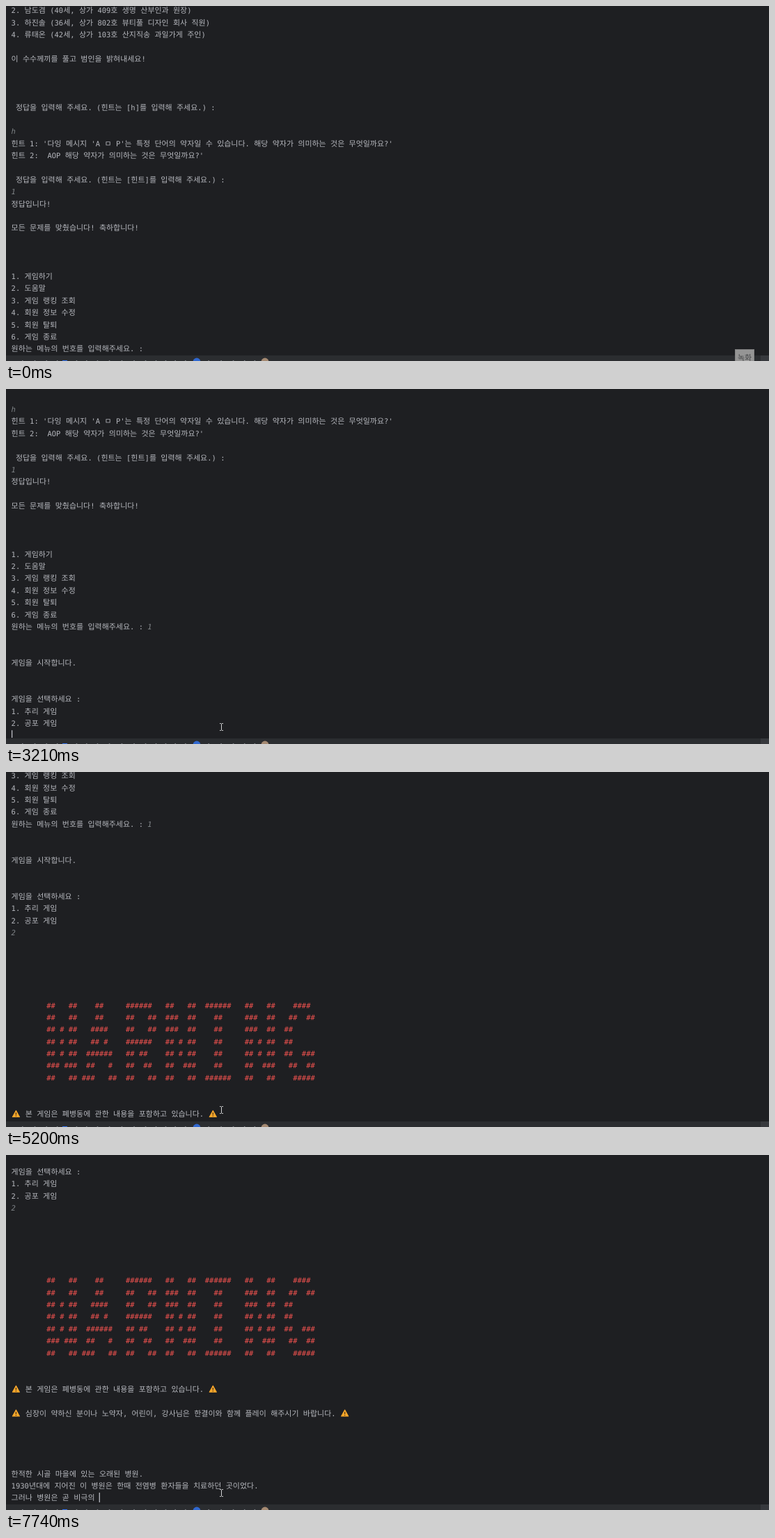
An HTML page that plays this animation: 1096 px wide and 511 px high, repeating every 8 s.

```html
<!DOCTYPE html>
<html lang="ko">
<head>
<meta charset="utf-8">
<title>콘솔 게임</title>
<style>
  html, body { margin: 0; width: 100%; height: 100%; overflow: hidden; background: #1e1f22; }
  svg { display: block; }
  text { white-space: pre; text-rendering: geometricPrecision; fill: #b5b7bd;
         font: 10.5px "DejaVu Sans Mono", monospace; }
  .ko { font: 10.98px "Noto Sans CJK KR", "Noto Sans CJK", sans-serif; }
  .input { fill: #7f8387; font-style: italic; }
  .banner { fill: #f0524f; }
  #tooltip text { fill: #444547; }
</style>
</head>
<body>
<svg width="1096" height="511" viewBox="0 0 1096 511">
  <defs>
    <clipPath id="view"><rect width="1096" height="502"/></clipPath>
    <g id="warn">
      <path d="M6.8 -8.6 L11.8 .4 H1.8 Z" fill="#f9a72b" stroke="#f9a72b" stroke-width="1.2" stroke-linejoin="round"/>
      <path d="M6.8 -5.9 V-2.6 M6.8 -1.5 V-.3" stroke="#3b2c18" stroke-width="1.2"/>
    </g>
  </defs>
  <rect width="1096" height="511" fill="#1e1f22"/>
  <g clip-path="url(#view)">
    <g id="rows"></g>
    <rect id="caret" width="1.2" height="14" fill="#c4c6cc"/>
  </g>
  <rect y="503" width="1096" height="8" fill="#2b2d30"/>
  <rect x="1084" y="503" width="12" height="8" fill="#37393d"/>
  <g id="ticks" fill="#85888e"></g>
  <rect x="81" y="510" width="7" height="1" fill="#3574f0"/>
  <circle cx="274" cy="512" r="5.4" fill="#3068d0"/>
  <circle cx="372" cy="512" r="5.4" fill="#a58a72"/>
  <g id="tooltip">
    <rect x="1047.5" y="494.5" width="27" height="18" fill="#959595" stroke="#828282"/>
    <text class="ko" x="1051" y="509.5">녹화</text>
  </g>
  <path id="pointer" d="M-2.5 -5 H-1 L0 -4.3 L1 -5 H2.5 M0 -4.3 V4.3 M-2.5 5 H-1 L0 4.3 L1 5 H2.5"
        fill="none" stroke="#d4d5d7"/>
</svg>
<script>
const LOOP = 8000, ROW = 17.39, LEFT = 7.6, BASE = 10.4, PAGE = 29;
const $ = id => document.getElementById(id);
const mix = (a, b, p) => a + (b - a) * p;

// "~" starts what the player types, "^" marks a banner row.
const intro = `2. 남도겸 (40세, 상가 409호 생명 산부인과 원장)
3. 하진솔 (36세, 상가 802호 뷰티풀 디자인 회사 직원)
4. 류태온 (42세, 상가 103호 산지직송 과일가게 주인)

이 수수께끼를 풀고 범인을 밝혀내세요!



 정답을 입력해 주세요. (힌트는 [h]를 입력해 주세요.) :

~h
힌트 1: '다잉 메시지 'A ㅁ P'는 특정 단어의 약자일 수 있습니다. 해당 약자가 의미하는 것은 무엇일까요?'
힌트 2:  AOP 해당 약자가 의미하는 것은 무엇일까요?'

 정답을 입력해 주세요. (힌트는 [힌트]를 입력해 주세요.) :
~1
정답입니다!

모든 문제를 맞췄습니다! 축하합니다!



1. 게임하기
2. 도움말
3. 게임 랭킹 조회
4. 회원 정보 수정
5. 회원 탈퇴
6. 게임 종료
원하는 메뉴의 번호를 입력해주세요. : ~1`;

const chooser = `
게임을 시작합니다.


게임을 선택하세요 :
1. 추리 게임
2. 공포 게임
~2`;

const title = `



^        ##   ##    ##     ######   ##   ##  ######   ##   ##    ####
^        ##   ##    ##     ##   ##  ###  ##    ##     ###  ##   ##  ##
^        ## # ##   ####    ##   ##  ###  ##    ##     ###  ##  ##
^        ## # ##   ## #    ######   ## # ##    ##     ## # ##  ##
^        ## # ##  ######   ## ##    ## # ##    ##     ## # ##  ##  ###
^        ### ###  ##   #   ##  ##   ##  ###    ##     ##  ###   ##  ##
^        ##   ## ###   ##  ##   ##  ##   ##  ######   ##   ##    #####


⚠ 본 게임은 폐병동에 관한 내용을 포함하고 있습니다. ⚠

⚠ 심장이 약하신 분이나 노약자, 어린이, 강사님은 한결이와 함께 플레이 해주시기 바랍니다. ⚠



`;

const prints = [
  { at: 0, text: intro, keyAt: 1670 },
  { at: 1930, text: '' },
  { at: 3070, text: chooser, keyAt: 3870 },
  { at: 4070, text: '' },
  { at: 5070, text: title }
];

// "|" ends a piece that appears at once; the rest comes with the next line.
const story = [
  { start: 5126, pace: 26, text: '한적한 시골 마을|에 있는 오래된 병|원.' },
  { start: 5797, pace: 37, text: '1930|년대에 지어진 |이 병원은 한때 |전염병 환자들을| 치료하던 곳|이었다. |' },
  { start: 7340, pace: 28, text: '그러나 병원은| 곧 비극의 |' }
];

function typedSoFar({ start, pace, text }, t) {
  const budget = (t - start) / pace;
  let shown = '';
  for (const piece of text.split('|').slice(0, -1)) {
    if ((shown + piece).length > budget) break;
    shown += piece;
  }
  return shown;
}

// A single new line jumps, a longer print glides.
function glide(elapsed, count) {
  const p = count === 1 ? 1 : Math.min(1, Math.floor(elapsed / 70) / 3);
  return 1 - (1 - p) ** 3;
}

function consoleAt(t) {
  const lines = [];
  let scroll = 0;
  for (const { at, text, keyAt } of prints) {
    if (t < at) break;
    const added = text.split('\n');
    if (t < keyAt) added.push(added.pop().split('~')[0]);
    lines.push(...added);
    scroll = mix(scroll, lines.length - PAGE, glide(t - at, added.length));
  }
  story.forEach((line, i) => {
    const shown = typedSoFar(line, t);
    if (!shown) return;
    if (i) lines[lines.length - 1] = story[i - 1].text.replaceAll('|', '');
    lines.push(shown);
    scroll = lines.length - PAGE;
  });
  return { lines, scroll };
}

const isKo = c => c >= 'ㄱ' && c <= '힣';
const width = s => [...s].reduce((w, c) => w + (c === '⚠' ? 13.9 : isKo(c) ? 10.1 : 6.32), 0);

function drawRuns(text, x, y, style) {
  let out = '';
  for (const run of text.match(/⚠|[ㄱ-힣]+|[^ㄱ-힣⚠]+/g) || []) {
    if (run === '⚠') out += `<use href="#warn" x="${x}" y="${y}"/>`;
    else if (run.trim()) out += `<text class="${style} ${isKo(run[0]) ? 'ko' : ''}" x="${x}" y="${y}">${run}</text>`;
    x += width(run);
  }
  return out;
}

function drawLine(line, y) {
  const style = line[0] === '^' ? 'banner' : '';
  const [output, input = ''] = line.replace('^', '').split('~');
  return drawRuns(output, LEFT, y, style) + drawRuns(input, LEFT + width(output), y, 'input');
}

let drawn;
function drawConsole(t) {
  const { lines, scroll } = consoleAt(t);
  const baseline = row => BASE + (row - scroll) * ROW;
  const svg = lines.map((line, row) => row < scroll - 1 ? '' : drawLine(line, baseline(row))).join('');
  if (svg !== drawn) $('rows').innerHTML = drawn = svg;

  const last = lines.length - 1;
  const caretOn = t >= 1000 && !(t >= 2530 && t < 3070);
  $('caret').setAttribute('x', Math.max(8, LEFT + width(lines[last].replace('~', '')) - 0.2));
  $('caret').setAttribute('y', baseline(last) - 11.3);
  $('caret').style.display = caretOn ? '' : 'none';
}

const stepped = (t, from, to, n) =>
  Math.min(1, Math.max(0, Math.floor((t - from) / (to - from) * n) / n));

function drawPointer(t) {
  const p = stepped(t, 70, 870, 10), q = stepped(t, 863, 1130, 4);
  const ease = p * p * (3 - 2 * p);
  const x = mix(mix(1062, 306, ease), 309.5, q);
  const y = mix(mix(506, 483, ease), 486.5, q);
  $('pointer').setAttribute('transform', `translate(${x} ${y})`);
  $('pointer').style.display = t < 70 ? 'none' : '';
  $('tooltip').style.display = t < 70 ? '' : 'none';
}

// Tops of the tab labels cut off by the lower edge.
for (let i = 0; i < 22; i++) {
  const x = 23 + i * 15.8 + 3 * Math.sin(i * 7);
  if (Math.abs(x - 274) > 12 && Math.abs(x - 84) > 8) {
    $('ticks').innerHTML += `<rect x="${x}" y="510" width="1.5" height="1"/>`;
  }
}

const start = performance.now();
(function tick() {
  const t = (performance.now() - start) % LOOP;
  drawConsole(t);
  drawPointer(t);
  requestAnimationFrame(tick);
})();
</script>
</body>
</html>
```
